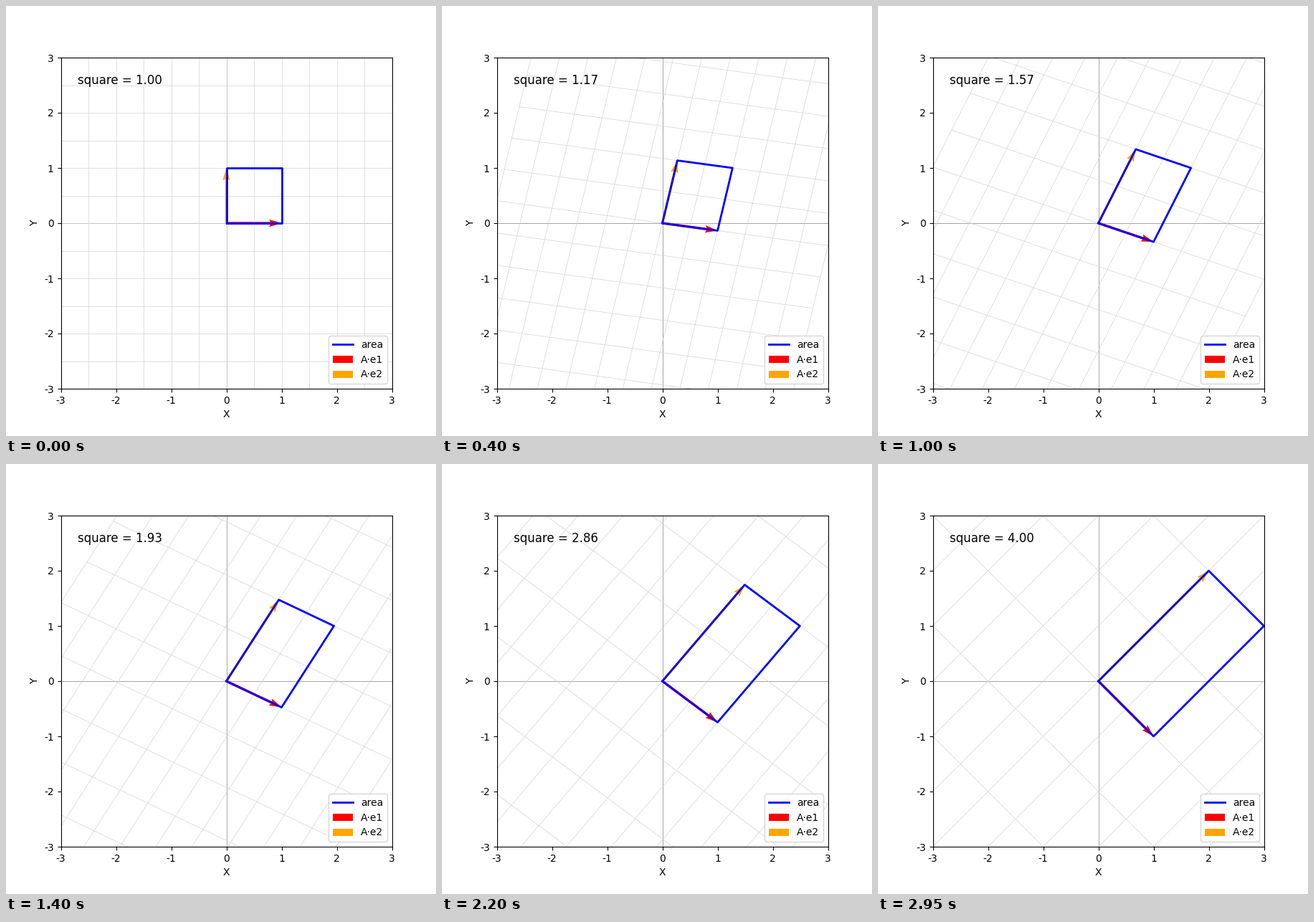
These frames come from a looping animation (600 by 600 pixels, 3 s). A matplotlib script:

```python
import numpy as np
import matplotlib.pyplot as plt
from matplotlib.animation import FuncAnimation

FRAMES = 60
INTERVAL = 50
LIM = 3

plt.rcParams["font.family"] = "DejaVu Sans"
plt.rcParams["axes.unicode_minus"] = False

fig, ax = plt.subplots(figsize=(6, 6), dpi=100)
ax.set_xlim(-LIM, LIM)
ax.set_ylim(-LIM, LIM)
ax.set_aspect("equal")
ax.set_xlabel("X")
ax.set_ylabel("Y")
ax.axhline(0, color="gray", lw=0.5)
ax.axvline(0, color="gray", lw=0.5)

# Each segment is a 2x2 array: one column per end point.
steps = np.arange(-LIM, LIM + 0.5, 0.5)
segments = [np.array([[s, s], [-LIM, LIM]]) for s in steps]
segments += [np.array([[-LIM, LIM], [s, s]]) for s in steps]
grid = [ax.plot(*seg, color="lightgray", lw=0.5)[0] for seg in segments]

unit_square = np.array([[0, 1, 1, 0, 0], [0, 0, 1, 1, 0]])
outline, = ax.plot(*unit_square, color="blue", lw=2, label="area")


def make_arrow(u, v, color, label):
    return ax.quiver(0, 0, u, v, color=color, label=label,
                     angles="xy", scale_units="xy", scale=1)


arrows = [make_arrow(1, 0, "red", "A·e1"),
          make_arrow(0, 1, "orange", "A·e2")]
caption = ax.text(0.05, 0.95, "", transform=ax.transAxes,
                  fontsize=12, va="top")
ax.legend(loc="lower right")

identity = np.eye(2)
target = np.array([[1, 2], [-1, 2]])


def update(i):
    t = i / (FRAMES - 1)
    A = (1 - t) * identity + t * target
    for line, seg in zip(grid, segments):
        line.set_data(*(A @ seg))
    outline.set_data(*(A @ unit_square))
    for arrow, (u, v) in zip(arrows, A.T):
        arrow.set_UVC(u, v)
    caption.set_text(f"square = {np.linalg.det(A):.2f}")
    return [*grid, outline, *arrows, caption]


anim = FuncAnimation(fig, update, frames=FRAMES, interval=INTERVAL,
                     repeat=True, repeat_delay=0)
plt.show()
```
